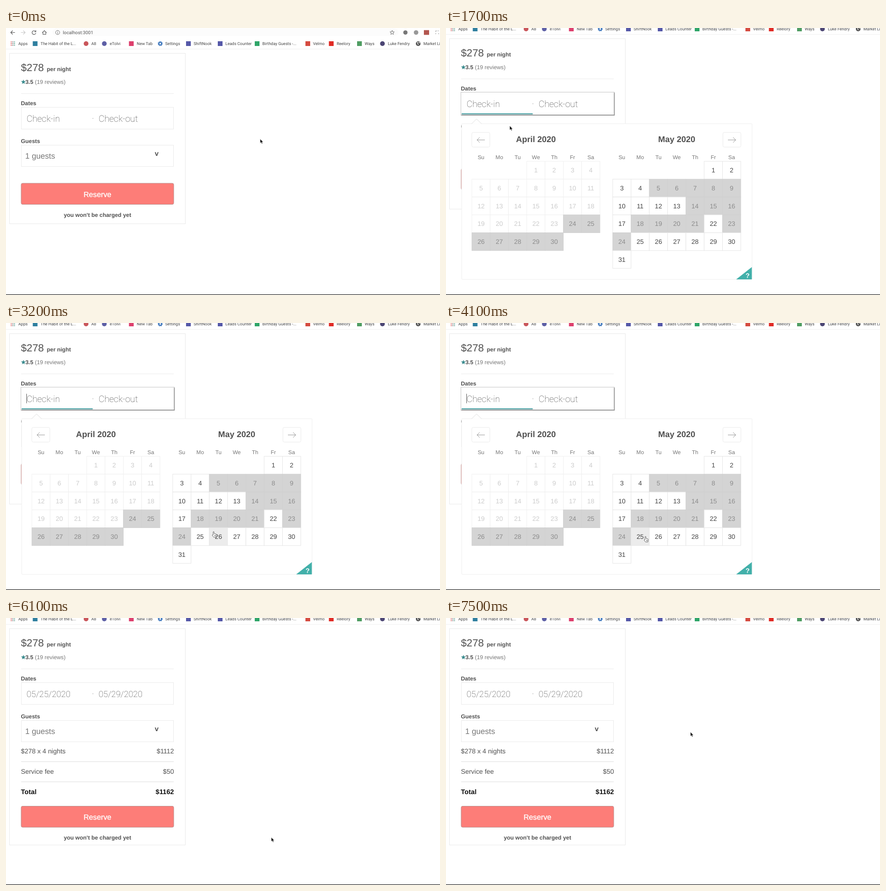
These frames come from a looping animation (916 px wide and 564 px high, 7.6 s). An HTML page:

```html
<!DOCTYPE html>
<html lang="en">
<head>
<meta charset="utf-8">
<title>Booking form</title>
<style>
html, body { margin: 0; width: 100%; height: 100%; overflow: hidden; background: #fff; }
svg { display: block; width: 916px; height: 564px; font-family: "Liberation Sans", Arial, sans-serif; white-space: pre; text-rendering: geometricPrecision; }
.ui { font-family: Roboto, Inter, sans-serif; }
.thin { font-family: Roboto, Inter, sans-serif; font-weight: 200; }
.b { font-weight: bold; }
</style>
</head>
<body>
<svg id="stage" viewBox="0 0 916 564"></svg>
<script>
const LOOP = 7600, SCROLL = 31;
const OPEN = 1600, CHECK_IN = 4500, CLOSE = 5800;
const TEAL = '#42b0aa', LINE = '#ebebeb';

const text = (x, y, s, size, fill = '#505050', extra = '') =>
  `<text x="${x}" y="${y}" font-size="${size}" fill="${fill}" ${extra}>${s}</text>`;
const rect = (x, y, w, h, fill, stroke = 'none', rx = 0) =>
  `<rect x="${x}" y="${y}" width="${w}" height="${h}" fill="${fill}" stroke="${stroke}" rx="${rx}"/>`;
const disc = (x, y, r, fill, extra = '') =>
  `<circle cx="${x}" cy="${y}" r="${r}" fill="${fill}" ${extra}/>`;
const path = (d, stroke, width = 1, fill = 'none') =>
  `<path d="${d}" stroke="${stroke}" stroke-width="${width}" fill="${fill}"/>`;
const bold = ' class="b" ', right = ' text-anchor="end" ', mid = ' text-anchor="middle" ';

function star(cx, cy, r, fill, stroke = 'none') {
  const pts = Array.from({ length: 10 }, (_, i) => {
    const a = i * Math.PI / 5, d = i % 2 ? r * 0.42 : r;
    return `${(cx + d * Math.sin(a)).toFixed(2)},${(cy - d * Math.cos(a)).toFixed(2)}`;
  });
  return `<polygon points="${pts.join(' ')}" fill="${fill}" stroke="${stroke}" stroke-width=".9"/>`;
}

// Browser chrome: x of icon centre, x of label, label, shape, colour
const bookmarks = [
  [61.5, 73, 'The Habit of the L...', 's', '#2f7f9f'],
  [169, 180, 'A8', 'c', '#c9565a'],
  [207.5, 219, 'eTolvi', 'c', '#5d5fa5'],
  [264.5, 276, 'New Tab', 's', '#dd3f6c'],
  [325.5, 336, 'Settings', 'gear', '#3f78bd'],
  [385, 396, 'ShiftNook', 's', '#5558a8'],
  [452, 463, 'Leads Counter', 's', '#5558a8'],
  [530, 541, 'Birthday Guests -...', 's', '#2fa568'],
  [637, 648, 'Velmo', 's', '#d54b40'],
  [686.5, 698, 'Reelory', 's', '#e02a24'],
  [746, 757, 'Ways', 's', '#4f9d62'],
  [794.5, 806, 'Luke Fendry', 'c', '#4b4573'],
  [870, 881, 'Market Li', 'globe', '#555']
];
const shapes = {
  s: (x, c) => rect(x - 5, 28, 10, 10, c),
  c: (x, c) => disc(x, 33, 5, c),
  gear: (x, c) => disc(x, 33, 2.9, 'none', `stroke="${c}" stroke-width="2.4"`) +
    disc(x, 33, 4.5, 'none', `stroke="${c}" stroke-width="1.4" stroke-dasharray="1.8 1.734"`),
  globe: (x, c) => disc(x, 33, 5, c) +
    path(`M${x - 3} 30q3 0 2 2t2 3M${x + 1} 29.5l3 2.5`, '#fff', 1.2)
};

function browserBar() {
  let s = rect(98, 1, 730, 16, '#fcfcfc', 'none', 8);
  s += path('M19 9.5H10M14 5.5L10 9.5L14 13.5', '#555', 1.1);
  s += path('M31.5 9.5H40.5M36.5 5.5L40.5 9.5L36.5 13.5', '#c8c8c8', 1.1);
  s += path('M62 7A4 4 0 1 0 63 10.5M63 5V8H60', '#555', 1.2);
  s += path('M76.5 10L81 5.5L85.5 10M78 9V13.5H84V9', '#555', 1.1);
  s += disc(109, 9.5, 4.3, 'none', 'stroke="#666" stroke-width=".9"') + path('M109 9V12M109 7V8', '#666');
  s += text(120, 13, 'localhost:3001', 9.75, '#555', 'class="ui"');
  s += star(815, 9.7, 4.8, 'none', '#666');
  s += disc(843, 9.5, 4.5, '#777') + disc(865.5, 9.5, 4.8, '#999') + rect(882, 4.5, 11, 10, '#b3564f');
  s += path('M907 8V6H909M911 6H913M907 11V13M912 12H914', '#888');
  for (let i = 0; i < 9; i++) s += rect(10 + i % 3 * 3.5, 28.5 + Math.floor(i / 3) * 3.5, 2, 2, ['#d66', '#777', '#6a9'][i % 3]);
  s += text(26, 36, 'Apps', 8.6, '#444', 'class="ui"');
  for (const [ix, tx, label, shape, color] of bookmarks)
    s += shapes[shape](ix, color) + text(tx, 36, label, 8.6, '#444', 'class="ui"');
  return s + path('M0 44.5H916', '#f0f0f0');
}
const bar = browserBar();

const header = text(31.5, 91, '$278', 21.8) + text(86, 90.5, 'per night', 11.9, '#505050', bold) +
  star(36.7, 114, 5.3, '#3a8b8e') + text(41, 117.5, '3.5', 11.9, '#505050', bold) +
  text(61, 117.5, '(19 reviews)', 11.9, '#777') +
  path('M32 138.5H354', LINE) + text(31.5, 163, 'Dates', 11.9, '#505050', bold);

const guests = text(31.5, 243, 'Guests', 11.9, '#505050', bold) + rect(32.5, 247.5, 321, 45, '#fff', LINE) +
  text(40.5, 276, '1 guests', 16.7, '#777') + text(318, 269.5, 'v', 14.5, '#505050', bold + mid);

function reserve(dy) {
  return `<g transform="translate(0 ${dy})">` + rect(32, 328, 322, 44.5, '#fd7d78', '#b98f8d', 3) +
    text(193, 356.5, 'Reserve', 15.7, '#fff', mid + 'stroke="#fff" stroke-width=".4"') +
    text(193, 398.5, "you won't be charged yet", 11.9, '#505050', bold + mid) + '</g>';
}

const bill = [['$278 x 4 nights', '$1112'], ['Service fee', '$50'], ['Total', '$1162']].map(([label, sum], i) => {
  const y = 317 + i * 42.8, last = i === 2;
  const size = last ? 14.2 : 13.9, color = last ? '#111' : '#505050', cls = last ? bold : '';
  return text(31.5, y, label, size, color, cls) + text(354.5, y, sum, size, color, cls + right) +
    (last ? '' : path(`M32 ${334.5 + i * 42.5}H354`, '#ddd'));
}).join('');

// Calendar
const CW = 38.6, CH = 37.7, TOP = 281.6;
const months = [
  { name: 'April 2020', x: 54.7, first: 3, days: 30 },
  { name: 'May 2020', x: 351.9, first: 5, days: 31 }
];
const may = months[1];
const blockedMay = [5, 6, 7, 8, 9, 14, 15, 16, 18, 19, 20, 21, 23, 24];
const isBlocked = (m, d) => m === may ? blockedMay.includes(d) : d >= 24;

function dayAt(x, y) {
  const c = Math.floor((x - may.x) / CW), r = Math.floor((y - TOP) / CH);
  const d = r * 7 + c - may.first + 1;
  return c >= 0 && c < 7 && r >= 0 && d >= 1 && d <= may.days && !blockedMay.includes(d) ? d : 0;
}

function dayStyle(m, d, hover, picked) {
  if (isBlocked(m, d)) return ['#d4d4d4', '#d0d0d0', '#8c8c8c'];
  if (m !== may) return ['#fff', '#f0f0f0', '#ccc'];
  if (picked && d === 25) return [TEAL, TEAL, '#fff', bold];
  if (picked && d > 25 && d <= hover) return ['#c3f3f2', '#9fe5e2', '#2c8a92'];
  return [d === hover ? '#ececec' : '#fff', '#e6e6e6', '#444'];
}

function monthView(m, hover, picked) {
  let s = text(m.x + CW * 3.5, 241, m.name, 17.6, '#505050', bold + mid);
  ['Su', 'Mo', 'Tu', 'We', 'Th', 'Fr', 'Sa'].forEach((n, i) => {
    s += text(m.x + CW * (i + .5), 277, n, 11.5, '#777', mid);
  });
  for (let d = 1; d <= m.days; d++) {
    const k = d + m.first - 1, x = m.x + k % 7 * CW, y = TOP + Math.floor(k / 7) * CH;
    const [fill, stroke, color, cls = ''] = dayStyle(m, d, hover, picked);
    s += rect(x, y, CW, CH, fill, stroke) + text(x + CW / 2, y + 23.6, d, 13.6, color, cls + mid);
  }
  return s;
}

function picker(hover, picked) {
  const n = picked ? 217 : 64.5;
  return rect(33, 202, 613, 329, '#fff', '#eee', 2) +
    path(`M${n - 10.5} 202.5L${n} 192L${n + 10.5} 202.5`, '#ddd', 1, '#fff') +
    rect(54.5, 220.5, 38, 31, '#fff', LINE, 3) + path('M82 236.5H65.5M71 231L65.5 236.5L71 242', '#999') +
    rect(584.5, 220.5, 38, 31, '#fff', LINE, 3) + path('M595 236.5H611.5M606 231L611.5 236.5L606 242', '#999') +
    months.map(m => monthView(m, hover, picked)).join('') +
    path('M612.5 531H645.5V505Z', 'none', 0, TEAL) + text(636.5, 527.5, '?', 14, '#fff', bold + mid);
}

// Pointer: time, x, y
const route = [
  [0, 536.5, 234.5], [300, 536.5, 234.5], [1200, 116, 193], [1600, 116, 193], [2300, 443, 438], [2900, 443, 438],
  [3900, 421, 451], [4500, 421, 451], [5200, 550, 469], [5800, 550, 469], [6100, 560, 463.5],
  [6600, 560, 463.5], [7400, 516, 241], [LOOP, 516, 241]
];
function pointerAt(t) {
  const i = route.findIndex(k => k[0] > t), [t0, x0, y0] = route[i - 1], [t1, x1, y1] = route[i];
  const u = (t - t0) / (t1 - t0), e = u * u * (3 - 2 * u);
  return [x0 + (x1 - x0) * e, y0 + (y1 - y0) * e];
}
const cursors = {
  arrow: path('M0 0V8.6L2 6.8L3.4 10L4.9 9.4L3.5 6.4H6.2Z', '#fff', .4, '#111'),
  hand: path('M-1 .8a1 1 0 0 1 2 0V4l3.8.9q1.3.4 1.1 1.9L5.2 11.5H0L-3 7.5q.4-1.6 2-.4ZM2.2 7V9.5M3.8 7V9.5', '#444', .8, '#fff'),
  beam: path('M-2 -5.5Q0 -5.5 0 -4Q0 -5.5 2 -5.5M0 -4V4M-2 5.5Q0 5.5 0 4Q0 5.5 2 5.5M-1.2 1.5H1.2', '#333', .9)
};

function dateField(t, open, picked, done, active) {
  let s = active
    ? rect(31, 166, 325, 50, '#c4c4c4') + rect(33, 168, 323.2, 48, '#999') + rect(32, 167, 322.3, 47, '#fff')
    : rect(32.5, 167.5, 321, 46, '#fff', LINE);
  const entry = (x, value, hint) => text(x, 197.5, value || hint, value ? 18 : 18.9, '#3c3c3c', 'class="thin"');
  s += entry(43.5, picked && '05/25/2020', 'Check-in') + entry(195.5, done && '05/29/2020', 'Check-out');
  s += rect(183, 190, 1, 2, '#aaa');
  if (open) {
    s += picked ? rect(185, 211, 151, 2, '#3d989c') : rect(33, 211.3, 150, 2, '#3d989c');
    const since = picked ? t - CHECK_IN : t - OPEN + 700;
    if (since % 1000 < 500) s += rect(picked ? 195 : 43, 180.5, 1, 20, '#555');
  }
  return s;
}

function scene(t) {
  const [x, y] = pointerAt(t);
  const open = t >= OPEN && t < CLOSE, picked = t >= CHECK_IN, done = t >= CLOSE;
  const dy = t >= OPEN ? SCROLL : 0;
  const overField = x > 32 && x < 354 && y + dy > 167 && y + dy < 214;
  const hover = open ? dayAt(x, y) : 0;
  const cursor = hover ? 'hand' : overField ? 'beam' : 'arrow';

  return `<g transform="translate(0 ${-dy})">` + bar +
    rect(7.5, 53.5, 371, done ? 457 : 360, '#fff', '#e9e9e9') + header +
    dateField(t, open, picked, done, open || overField) + guests + (done ? bill : '') + reserve(done ? 100.5 : 0) + '</g>' +
    (open ? picker(hover, picked) : '') + rect(0, 562.8, 916, 1.2, '#222') +
    `<g transform="translate(${x.toFixed(1)} ${y.toFixed(1)})">${cursors[cursor]}</g>`;
}

const stage = document.getElementById('stage');
const start = performance.now();
function draw() {
  stage.innerHTML = scene((performance.now() - start) % LOOP);
  requestAnimationFrame(draw);
}
draw();
</script>
</body>
</html>
```
